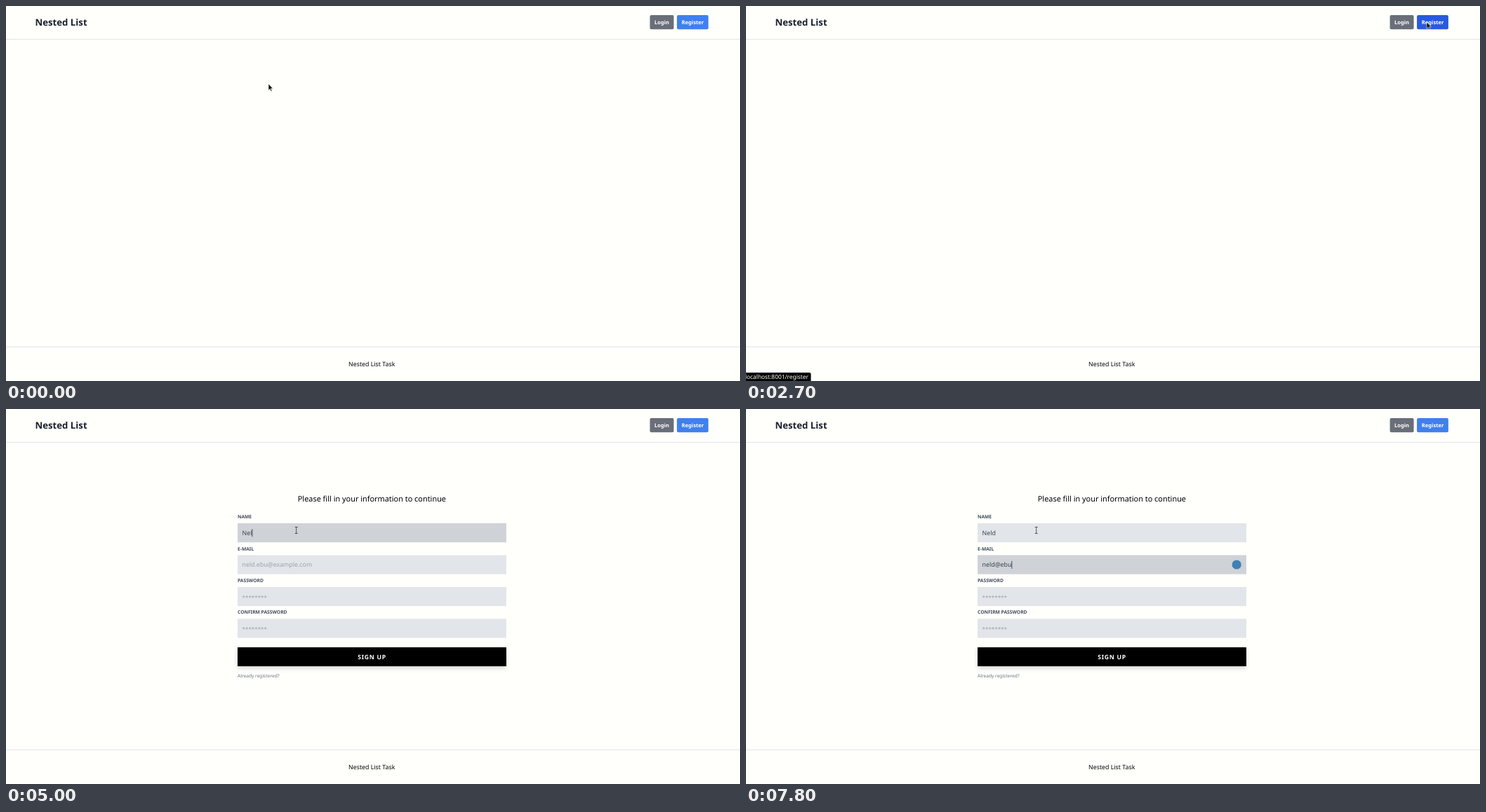
Recreate the animation shown at these times as an HTML page. Size 1046 by 535 pixels, loop 8 s.

```html
<!DOCTYPE html>
<html lang="en">
<head>
<meta charset="utf-8">
<title>Nested List</title>
<style>
  html, body { margin: 0; width: 100%; height: 100%; overflow: hidden; background: #fffffc; }
  svg { display: block; width: 1046px; height: 535px; }
  text { font: 8.8px "Noto Sans", sans-serif; text-rendering: geometricPrecision; }
  .line { fill: #e3e7e6; }
  .title { font-size: 13.2px; font-weight: 700; }
  .button { font-size: 7.6px; font-weight: 600; fill: #fff; }
  .mid { text-anchor: middle; }
  .heading { font-size: 10.9px; font-weight: 500; }
  .label { font-size: 6.7px; font-weight: 700; fill: #414b5a; }
  .hint { fill: #9ca3af; }
  .typed { fill: #374151; }
  .submit { font-size: 8.7px; font-weight: 600; fill: #fff; letter-spacing: .08em; }
  .small { font-size: 6.6px; fill: #6b7280; }
  .shadow { filter: drop-shadow(0 3px 3px rgba(0, 0, 0, .16)); }
  .url { font-size: 8.35px; fill: #fff; text-anchor: end; }
</style>
</head>
<body>
<svg viewBox="0 0 1046 535">
  <rect class="line" y="47" width="1046" height="1.1"/>
  <rect class="line" y="485.6" width="1046" height="1.1"/>
  <text id="title" class="title" x="41.5" y="27.6">Nested List</text>
  <rect x="917.6" y="13" width="34" height="20.3" rx="2" fill="#696e78"/>
  <text class="mid button" x="934.5" y="26">Login</text>
  <rect id="register" x="956.1" y="13" width="44.8" height="20.3" rx="2"/>
  <text class="mid button" x="978.6" y="26">Register</text>
  <text class="mid" x="521.2" y="513.8">Nested List Task</text>

  <g id="form">
    <text class="mid heading" x="521.4" y="131.7">Please fill in your information to continue</text>
    <g id="fields"></g>
    <rect class="shadow" x="330" y="340" width="383" height="27"/>
    <text class="mid submit" x="521.5" y="357">SIGN UP</text>
    <text class="small" x="330" y="383.2">Already registered?</text>
    <circle id="badge" cx="699.2" cy="222" r="6.6" fill="#3f80b5"/>
    <rect id="caret" width=".9" height="11" fill="#374151"/>
  </g>

  <g id="status">
    <path d="M0 523H90.5Q92.5 523 92.5 525V535H0Z"/>
    <text class="url" x="89" y="532.2">localhost:8001/register</text>
  </g>

  <g id="pointer">
    <path id="arrow" d="M0 0V9.3L2.1 7.4 3.7 10.8 5.1 10.1 3.6 6.8H6.4Z" fill="#111" stroke="#fff" stroke-width=".6"/>
    <path id="hand" d="M-1 0H1V4L5.5 5V8L4.5 11H-1L-3.5 6.5-1 7Z" fill="#fff" stroke="#111" stroke-width=".8" stroke-linejoin="round"/>
    <path id="beam" d="M-2-4.5H2M0-4.5V4.5M-2 4.5H2" fill="none" stroke="#333" stroke-width=".8"/>
  </g>
</svg>
<script>
const LOOP = 8000, STEP = 100, PAGE = 3100, TAB = 5200;
const LEFT = 330, WIDTH = 383, HEIGHT = 27.2, PITCH = 45.45;
const $ = id => document.getElementById(id);
const show = (id, on) => { $(id).style.display = on ? '' : 'none'; };
const set = (el, attrs) => { for (const k in attrs) el.setAttribute(k, attrs[k]); };
const ramp = (t, from, to) => Math.min(1, Math.max(0, (t - from) / (to - from)));
const ease = p => p * p * (3 - 2 * p);
const mix = (a, b, p) => `color-mix(in srgb, ${b} ${p * 100}%, ${a})`;

function add(tag, attrs, text = '') {
  const el = document.createElementNS('http://www.w3.org/2000/svg', tag);
  set(el, attrs);
  el.textContent = text;
  return $('fields').appendChild(el);
}

const fields = [
  ['NAME', 'Neld'], ['E-MAIL', 'neld.ebu@example.com'],
  ['PASSWORD', '********'], ['CONFIRM PASSWORD', '********'],
].map(([label, hint], i) => {
  const y = 163 + i * PITCH;
  add('text', { class: 'label', x: LEFT, y: y - 6.9 }, label);
  const box = add('rect', { x: LEFT, y, width: WIDTH, height: HEIGHT, fill: '#e2e5e9' });
  const text = add('text', { class: 'hint', x: LEFT + 6.6, y: y + 17 }, hint);
  if (i > 1) set(text, { 'font-size': 8, style: 'font-size: 8px', y: y + 17.8 });
  return { y, box, text, hint };
});

// Each move eases the pointer to x, y between two times.
const moves = [
  { from: 200, to: 900, x: 88, y: 22 },
  { from: 1000, to: 1400, x: 896, y: 73 },
  { from: 1400, to: 1900, x: 988, y: 25 },
  { from: 2600, to: 2700, x: 970, y: 23 },
  { from: PAGE, to: 3800, x: 413.7, y: 173 },
];
function pointerAt(t) {
  return moves.reduce((pos, { from, to, x, y }) => {
    const p = ease(ramp(t, from, to));
    return { x: pos.x + (x - pos.x) * p, y: pos.y + (y - pos.y) * p };
  }, { x: 374, y: 111 });
}

// Bursts of keys: the first at `start`, then one every `gap`.
const bursts = [
  [{ start: 4600, gap: 200, keys: 'Neld' }],
  [
    { start: 6000, gap: 100, keys: 'n' }, { start: 6400, gap: 150, keys: 'eld' },
    { start: 7300, gap: 100, keys: '@' }, { start: 7600, gap: 100, keys: 'ebu' },
  ],
];
const typedAt = (list, t) => list.map(({ start, gap, keys }) =>
  keys.slice(0, Math.max(0, Math.floor((t - start) / gap) + 1))).join('');

function drawFields(t) {
  const tabbed = ramp(t, TAB - 100, TAB + 100);
  const focus = [ramp(t, 3900, 4000) - tabbed, tabbed];
  bursts.forEach((list, i) => {
    const { box, text, hint } = fields[i];
    const typed = typedAt(list, t);
    set(box, { fill: mix('#e2e5e9', '#cfd2d7', focus[i]) });
    set(text, { class: typed ? 'typed' : 'hint' });
    text.textContent = typed || hint;
  });
  const { y, text } = fields[t < TAB ? 0 : 1];
  const typed = text.getAttribute('class') === 'typed';
  set($('caret'), { x: LEFT + 6.6 + (typed ? text.getComputedTextLength() : 0), y: y + 8.4 });
  show('caret', t >= 4000 && !(t >= 4400 && t < 4600));
}

function draw(t) {
  const { x, y } = pointerAt(t);
  const overTitle = x < 116 && y < 30;
  const overRegister = x > 956 && y < 33;
  const inField = y > 160;
  const loading = t >= 2700 && t < PAGE;
  const pointing = !loading && (overTitle || overRegister);
  set($('pointer'), { transform: `translate(${x} ${y})` });
  show('beam', inField);
  show('hand', pointing);
  show('arrow', !inField && !pointing);

  set($('title'), { fill: mix('#1a202c', '#4a5568', ramp(t, 600, 800) - ramp(t, 1300, 1500)) });
  set($('register'), { fill: overRegister && t < PAGE ? '#285adc' : '#3f80ee' });
  set($('status'), { opacity: ramp(t, 2000, 2500) - ramp(t, PAGE - 100, PAGE + 150) });
  show('form', t >= PAGE);
  show('badge', t >= 5500);
  if (t >= PAGE) drawFields(t);
}

const start = performance.now();
function tick() {
  const t = (performance.now() - start) % LOOP;
  draw(Math.floor(t / STEP) * STEP);
  requestAnimationFrame(tick);
}
tick();
</script>
</body>
</html>
```
